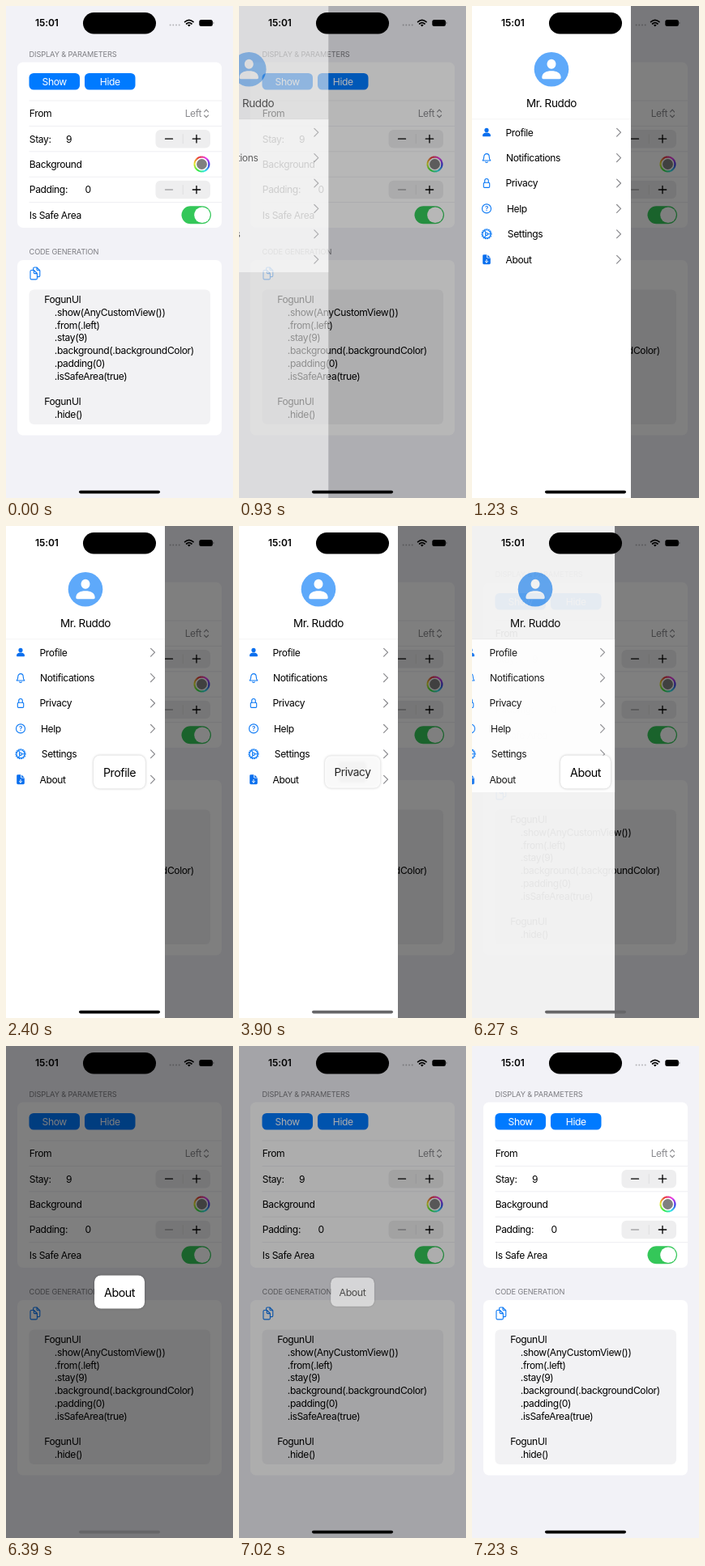
These frames come from a looping animation (280x608 px, 7650 ms). An HTML page:

```html
<!DOCTYPE html>
<html lang="en">
<head>
<meta charset="utf-8">
<title>Side menu popup</title>
<style>
  html, body { margin: 0; width: 100%; height: 100%; overflow: hidden; background: #f2f2f7; }
  svg { position: absolute; left: 0; top: 0; width: 280px; height: 608px; }
  svg, .toast { font: 12.1px Inter, "Liberation Sans", sans-serif; letter-spacing: -.032em; }
  .caption { font-size: 9.26px; letter-spacing: -.014em; fill: #7d7d82; }
  .mid { text-anchor: middle; }
  .card { fill: #fff; }
  .rule { stroke: #e9e9ec; stroke-width: .7; }
  .line { fill: none; stroke-linecap: round; stroke-linejoin: round; }
  .blue { stroke: #0a78f5; stroke-width: 1.1; }
  .solid { fill: #0a6fee; }
  .toast {
    position: absolute; left: 140px; top: 303.5px; padding: 12px; border-radius: 8px;
    font-size: 14.25px; line-height: 17px; white-space: nowrap;
    filter: drop-shadow(0 0 1.5px rgba(0, 0, 0, .25));
  }
</style>
</head>
<body>
<svg viewBox="0 0 280 608">
  <rect width="280" height="608" fill="#f2f2f7"/>
  <text class="caption" x="28.5" y="62.8">DISPLAY &amp; PARAMETERS</text>
  <rect class="card" x="14" y="69.5" width="252" height="204.5" rx="7"/>
  <g fill="#007aff">
    <rect x="28.5" y="83" width="62.5" height="20.5" rx="5.5"/>
    <rect x="97" y="83" width="62.5" height="20.5" rx="5.5"/>
  </g>
  <g class="mid" fill="#fff">
    <text x="59.7" y="97.7">Show</text>
    <text x="128.2" y="97.7">Hide</text>
  </g>
  <path class="rule" d="M28.5 117H266M28.5 148.4H266M28.5 179.8H266M28.5 211.2H266M28.5 242.6H266"/>
  <text x="28.8" y="137.2">From</text>
  <text x="28.8" y="168.6">Stay:</text>
  <text x="74" y="168.6">9</text>
  <text x="28.8" y="200">Background</text>
  <text x="28.8" y="231.4">Padding:</text>
  <text x="97.5" y="231.4">0</text>
  <text x="28.8" y="262.8">Is Safe Area</text>
  <text x="241" y="137.2" text-anchor="end" fill="#8a8a8e">Left</text>
  <path class="line" stroke="#8a8a8e" stroke-width="1.1" d="M244.6 130.8l2.5-2.6 2.5 2.6M244.6 135l2.5 2.6 2.5-2.6"/>
  <g id="steppers"></g>
  <g id="well" fill="none" stroke-width="2"></g>
  <circle cx="241.5" cy="195.5" r="6.4" fill="#808080"/>
  <rect x="216.5" y="247.2" width="36.5" height="22" rx="11" fill="#34c759"/>
  <circle cx="242" cy="258.2" r="9.8" fill="#fff"/>

  <text class="caption" x="28.5" y="307">CODE GENERATION</text>
  <rect class="card" x="14" y="314" width="252" height="216.5" rx="7"/>
  <path class="line blue" d="M33.6 326v-1.6q0-1.4 1.4-1.4h3l3.8 3.8v6.4q0 1.4-1.4 1.4h-1.6M38 323v2.6q0 1.2 1.2 1.2h2.6M31.4 326.5h3l4 4v6q0 1.4-1.4 1.4h-5.6q-1.4 0-1.4-1.4v-8.6q0-1.4 1.4-1.4M34.3 326.6v2.8q0 1.2 1.2 1.2h2.8"/>
  <rect x="28.5" y="350.5" width="223.5" height="166.5" rx="6" fill="#f2f2f4"/>
  <g id="code"></g>

  <rect id="dim" width="280" height="608"/>

  <g id="panel">
    <rect id="list" y="140" width="196" height="189" fill="#fff"/>
    <g id="sheet">
      <rect width="196" height="608" fill="#fff"/>
      <circle cx="98" cy="78.2" r="21.3" fill="#5ea9fa"/>
      <g fill="#fff">
        <ellipse cx="98" cy="71.8" rx="5.5" ry="6"/>
        <path d="M86.3 88.6c0-6 5.2-8.4 11.7-8.4s11.7 2.4 11.7 8.4q0 1.6-1.6 1.6h-20.2q-1.6 0-1.6-1.6z"/>
      </g>
      <text class="mid" x="98" y="124.7" font-size="13.5">Mr. Ruddo</text>
      <path stroke="#f1f1f3" stroke-width=".7" d="M0 139.8H196"/>
      <g id="menu"></g>
    </g>
  </g>

  <text x="36" y="25.2" font-size="12" font-weight="600" letter-spacing="-.1">15:01</text>
  <rect x="95" y="8" width="90" height="26.5" rx="13.25"/>
  <g fill="#000" fill-opacity=".25">
    <circle cx="202.6" cy="23.4" r="1"/><circle cx="206.3" cy="23.4" r="1"/>
    <circle cx="210" cy="23.4" r="1"/><circle cx="213.7" cy="23.4" r="1"/>
  </g>
  <path class="line" stroke="#000" stroke-width="1.7" stroke-linecap="butt" d="M220.6 19.6q5.2-4.6 10.4 0M222.6 22q3.2-2.7 6.4 0"/>
  <path d="M223.9 23.4q1.9-1.4 3.8 0l-1.9 2z"/>
  <rect x="238.3" y="16.9" width="16.6" height="8" rx="2.5"/>
  <path d="M255.7 19.4q1.4 1.5 0 3z"/>
  <rect id="home" x="90" y="598.8" width="100" height="3.6" rx="1.8"/>
</svg>

<script>
const $ = id => document.getElementById(id);
const LOOP = 7650, FADE = 150;

const stepper = (y, minus) => `
  <rect x="184.5" y="${y - 11.2}" width="67.5" height="22.4" rx="6" fill="#eeeeef"/>
  <path d="M218.3 ${y - 6}v12" stroke="#dcdcdf" stroke-width=".8"/>
  <path class="line" stroke="${minus}" stroke-width="1.3" d="M196.5 ${y}h9"/>
  <path class="line" stroke="#000" stroke-width="1.3" d="M230.3 ${y}h9.4M235 ${y - 4.7}v9.4"/>`;
$('steppers').innerHTML = stepper(164.2, '#000') + stepper(227, '#a5a5a8');

// Rainbow ring built from short coloured arcs
const ringPoint = i => {
  const a = i * Math.PI / 18;
  return `${241.5 + 9 * Math.sin(a)} ${195.5 - 9 * Math.cos(a)}`;
};
$('well').innerHTML = Array.from({ length: 36 }, (_, i) =>
  `<path stroke="hsl(${330 - i * 10} 80% 55%)" d="M${ringPoint(i)}L${ringPoint(i + 1.2)}"/>`).join('');

const code = ['FogunUI', '.show(AnyCustomView())', '.from(.left)', '.stay(9)',
  '.background(.backgroundColor)', '.padding(0)', '.isSafeArea(true)', '', 'FogunUI', '.hide()'];
$('code').innerHTML = code.map((s, i) =>
  `<text x="${s[0] === '.' ? 59.8 : 47.2}" y="${367.2 + i * 15.72}">${s}</text>`).join('');

// Icons are drawn around their own centre
const items = [
  { name: 'Profile', x: 41.5, start: 1710, icon:
    '<circle class="solid" cy="-2.8" r="2.6"/><path class="solid" d="M-5 4.2c0-3 2.2-4 5-4s5 1 5 4q0 .8-.8.8h-8.4q-.8 0-.8-.8z"/>' },
  { name: 'Notifications', x: 42, start: 2580, icon:
    '<path class="line blue" d="M-4.8 3.4q1.6-1.6 1.6-5a3.2 3.4 0 0 1 6.4 0q0 3.4 1.6 5zM-1.4 5.2q1.4 1.3 2.8 0"/>' },
  { name: 'Privacy', x: 41.5, start: 3360, icon:
    '<rect class="line blue" x="-3.7" y="-.8" width="7.4" height="6.2" rx="1.2"/><path class="line blue" d="M-2.3-.8v-2.2a2.3 2.5 0 0 1 4.6 0v2.2"/>' },
  { name: 'Help', x: 43, start: 3870, icon:
    '<circle class="line blue" r="5.5"/><text class="mid solid" y="2.9" font-size="8" font-weight="600">?</text>' },
  { name: 'Settings', x: 43.8, start: 4470, icon:
    '<circle class="line blue" r="5"/><circle class="line blue" r="6" stroke-dasharray="1 1.5"/><circle class="line blue" r="1.6"/><path class="line blue" d="M1.6 0h3.2M-.8-1.4l-1.6-2.8M-.8 1.4l-1.6 2.8"/>' },
  { name: 'About', x: 41.5, start: 5250, icon:
    '<path class="solid" d="M-3.4-6h3.6v3.4q0 1 1 1h3.6v6.2q0 1.4-1.4 1.4h-6.8q-1.4 0-1.4-1.4v-9.2q0-1.4 1.4-1.4zM1.2-5.8l3.4 3.4h-3.4z"/><path class="line" stroke="#fff" d="M0 .2v3.6M-1.6 2.4l1.6 1.6 1.6-1.6"/>' },
];
$('menu').innerHTML = items.map(({ name, x, icon }, i) => {
  const y = 156.2 + i * 31.4;
  return `<g transform="translate(18 ${y})">${icon}</g>
    <text x="${x}" y="${y + 4.3}">${name}</text>
    <path class="line" stroke="#88888c" stroke-width="1.2" d="M178.6 ${y - 4.9}l4.9 4.9-4.9 4.9"/>`;
}).join('');

items.forEach((item, i) => {
  item.end = i + 1 < items.length ? items[i + 1].start : 6960;
  item.toast = document.createElement('div');
  item.toast.className = 'toast';
  item.toast.textContent = item.name;
  document.body.append(item.toast);
});

const ease = (t, start) => {
  const k = Math.min(1, Math.max(0, (t - start) / FADE));
  return (1 - Math.cos(Math.PI * k)) / 2;
};
const presence = (t, start, end) => ease(t, start) * (1 - ease(t, end));

function render() {
  const t = performance.now() % LOOP;
  const open = presence(t, 850, 6240);
  $('panel').setAttribute('transform', `translate(${-196 * (1 - open)} 0)`);
  $('list').setAttribute('opacity', open);
  $('sheet').setAttribute('opacity', open);
  $('dim').setAttribute('opacity', .5 * presence(t, 850, 6960));
  $('home').setAttribute('fill', t >= 2610 && t < 6630 ? '#666668' : '#000');
  for (const { toast, start, end } of items) {
    const p = presence(t, start, end);
    toast.style.visibility = p ? 'visible' : 'hidden';
    toast.style.background = `rgba(255, 255, 255, ${p})`;
    toast.style.color = `rgba(0, 0, 0, ${p})`;
    toast.style.transform = `translate(-50%, -50%) scale(${.62 + .38 * p})`;
  }
  requestAnimationFrame(render);
}
render();
</script>
</body>
</html>
```
